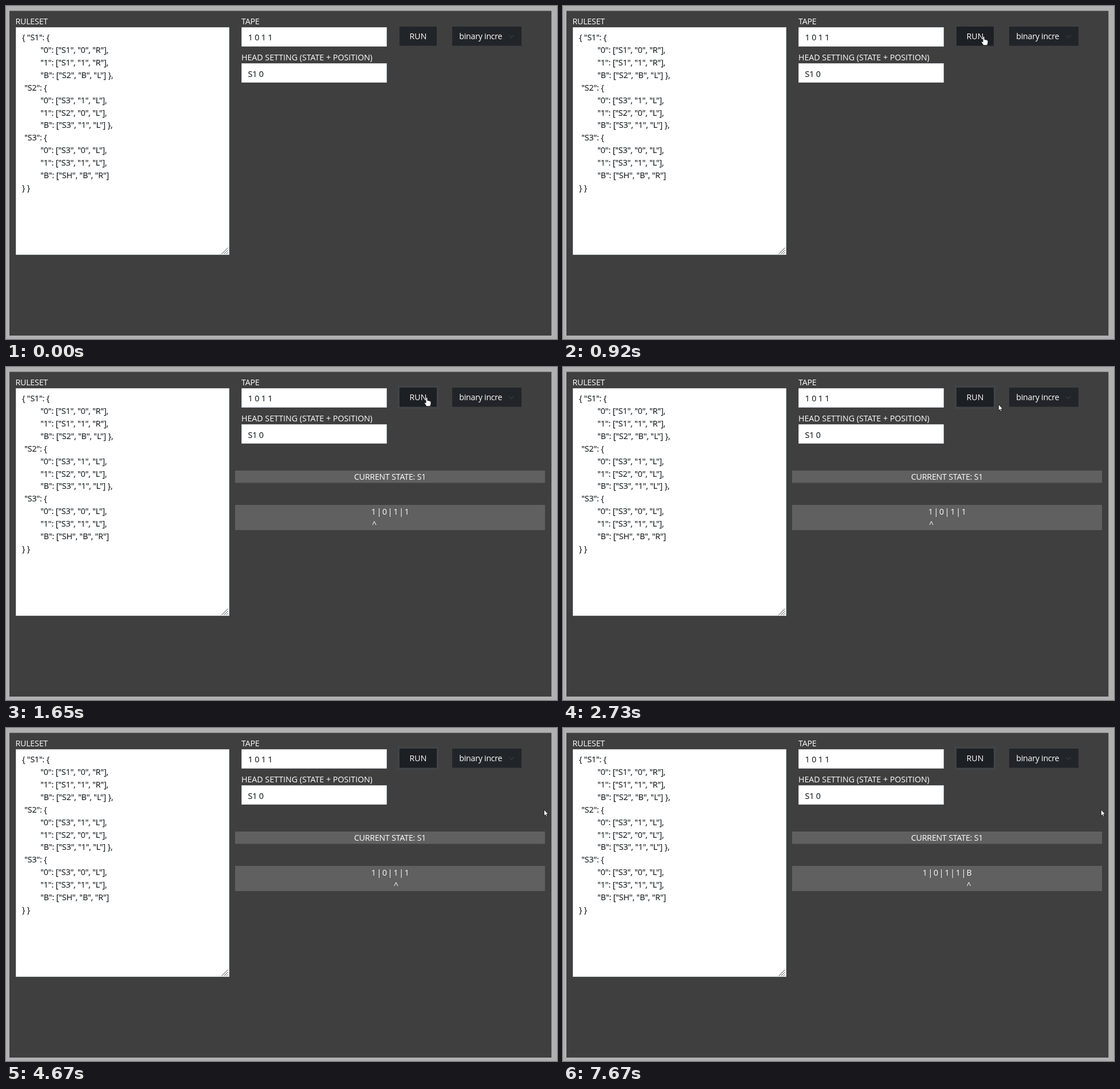
Animation of 962x582 px, one loop 8 s. Source, as an HTML page:

```html
<!DOCTYPE html>
<html lang="en">
<head>
<meta charset="utf-8">
<title>Turing machine</title>
<style>
  html, body { margin: 0; width: 100%; height: 100%; overflow: hidden; background: #b0b0b0; }
  svg { display: block; }
  text { font: 14.2px "Open Sans", "Noto Sans", sans-serif; fill: #fff; white-space: pre; }
  .dark { fill: #212529; stroke: #212529; stroke-width: .2; letter-spacing: -.12px; }
  .tight { letter-spacing: -.2px; }
  .mid { text-anchor: middle; }
  .field { fill: #fff; stroke: #ced4da; }
</style>
</head>
<body>
<svg width="962" height="582" viewBox="0 0 962 582">
  <path fill="#3f3f3f" d="M6 8.5H952.3V576H6z"/>
  <path class="field" d="M17.5 37.5H389.5V434.5H17.5zM411.5 37.5H664.5V70.5H411.5zM411.5 100.5H664.5V133.5H411.5z"/>
  <path stroke="#444" d="M376.5 433.5l11-11M380.5 433.5l7-7M384.5 433.5l3-3"/>
  <text class="tight" x="16.5" y="32.3">RULESET</text>
  <text class="tight" x="411" y="32.3">TAPE</text>
  <text x="411" y="95.2">HEAD SETTING (STATE + POSITION)</text>
  <text class="dark" x="422.7" y="60.2">1 0 1 1</text>
  <text class="dark" x="422.5" y="123.5">S1 0</text>
  <g id="rules"></g>

  <rect id="ring" x="683.5" y="32.5" width="72" height="40.5" fill="#424649" opacity="0"/>
  <rect id="run" x="687" y="36" width="65" height="33.5"/>
  <text class="mid" x="719.5" y="58.2">RUN</text>
  <path fill="#212529" d="M779 36H900V69.5H779z"/>
  <text x="791.3" y="58.2" letter-spacing="-.25">binary incre</text>
  <path fill="none" stroke="#343a40" stroke-width="1.3" d="M878 51l4.3 4.3 4.3-4.3"/>

  <g id="output">
    <path fill="#606060" d="M400 181H941V202.5H400zM400 241H941V285H400z"/>
    <text class="mid tight" x="670.5" y="197.3">CURRENT STATE: S1</text>
    <g id="cells"></g>
    <text class="mid" id="head" y="280">^</text>
  </g>

  <circle id="click" cx="734.5" cy="53.5" r="9.7" fill="#fff000" fill-opacity=".5"/>
  <g id="cursor">
    <path id="arrow" fill="#fff" stroke="#000" stroke-width=".8" d="M0 0V11.2L2.5 8.9 4.2 12.7 6 11.9 4.3 8.3H7.6z"/>
    <path id="beam" fill="none" stroke="#000" d="M-3-7.5H-1L0-6.5 1-7.5H3M0-6.5V6.5M-3 7.5H-1L0 6.5 1 7.5H3"/>
    <path id="hand" fill="#fff" stroke="#000" stroke-width=".5" d="M-1.3 .2Q0-1.4 1.3 .2V4.8Q2.6 4 3.4 5.2 4.7 4.4 5.4 5.8 7.2 5.4 7.3 7.2V10.4L6 14.5H-.4L-3.8 9.3Q-3.8 7.3-1.3 9z"/>
  </g>
</svg>
<script>
const $ = id => document.getElementById(id);
const LOOP = 8000;
const clamp = v => Math.max(0, Math.min(1, v));
const show = (el, on) => el.style.display = on ? '' : 'none';

function addText(parent, str, x, y, cls) {
  const el = document.createElementNS('http://www.w3.org/2000/svg', 'text');
  el.textContent = str;
  el.setAttribute('x', x);
  el.setAttribute('y', y);
  el.setAttribute('class', cls);
  parent.append(el);
}

const rules = [
  '{ "S1": {', '"0": ["S1", "0", "R"],', '"1": ["S1", "1", "R"],', '"B": ["S2", "B", "L"] },',
  '"S2": {', '"0": ["S3", "1", "L"],', '"1": ["S2", "0", "L"],', '"B": ["S3", "1", "L"] },',
  '"S3": {', '"0": ["S3", "0", "L"],', '"1": ["S3", "1", "L"],', '"B": ["SH", "B", "R"]', '} }'
];
rules.forEach((line, i) => {
  const x = i % 12 === 0 ? 28 : i % 4 ? 60.3 : 32.3;
  addText($('rules'), line, x, 60.1 + i * 21.9, 'dark');
});

// Head moves: time, caret centre, tape, centre of the first cell
const moves = [
  [1650, 643, '1011', 641.7],
  [3150, 662, '1011', 641.7],
  [4670, 681, '1011', 641.7],
  [6130, 699.3, '1011', 641.2],
  [7670, 708.6, '1011B', 631.7]
];

// Pointer strokes: start, frames, from, to, upward bend, first frame's share
const strokes = [
  [250, 4, [915, 559], [656, 55], 0, 0],
  [720, 4, [656, 55], [734.5, 54], 9, 1],
  [2660, 9, [734.5, 54], [939.3, 142.5], 0, 1]
];

function pointerAt(t) {
  const s = strokes.findLast(s => t >= s[0]);
  if (!s) return null;
  const [start, n, a, b, bend, lead] = s;
  const step = Math.min(n - 1, Math.floor((t - start) / (n > 4 ? 70 : 66.6)));
  const p = (step + lead) / (n - 1 + lead);
  const e = p * p * (3 - 2 * p);
  return [a[0] + (b[0] - a[0]) * e, a[1] + (b[1] - a[1]) * e - bend * 4 * e * (1 - e)];
}

let shown;
function drawTape(move) {
  if (shown === move) return;
  shown = move;
  const [, caret, tape, x0] = move;
  $('cells').replaceChildren();
  [...tape].forEach((c, i) => {
    const x = x0 + i * 19.37;
    if (i) addText($('cells'), '|', x - 9.7, 258.4, 'mid');
    addText($('cells'), c, x, 258.4, 'mid');
  });
  $('head').setAttribute('x', caret);
}

function draw(t) {
  const move = moves.findLast(m => t >= m[0]);
  show($('output'), move);
  if (move) drawTape(move);

  const pos = pointerAt(t);
  show($('cursor'), pos);
  let shape = 'arrow';
  if (pos) {
    const [x, y] = pos;
    if (x > 687 && x < 752 && y > 36 && y < 70) shape = 'hand';
    else if (x > 411 && x < 665 && (y > 37 && y < 71 || y > 100 && y < 134)) shape = 'beam';
    $('cursor').setAttribute('transform', `translate(${x} ${y})`);
  }
  for (const id of ['arrow', 'beam', 'hand']) show($(id), id === shape);

  const active = t >= 1380 || pos && shape === 'hand';
  $('run').setAttribute('fill', active ? '#1c1f23' : '#212529');
  $('ring').setAttribute('opacity', .7 * clamp((t - 1380) / 150));
  show($('click'), t >= 1380 && t < 1650);
}

const begin = performance.now();
function tick() {
  draw((performance.now() - begin) % LOOP);
  requestAnimationFrame(tick);
}
tick();
</script>
</body>
</html>
```
